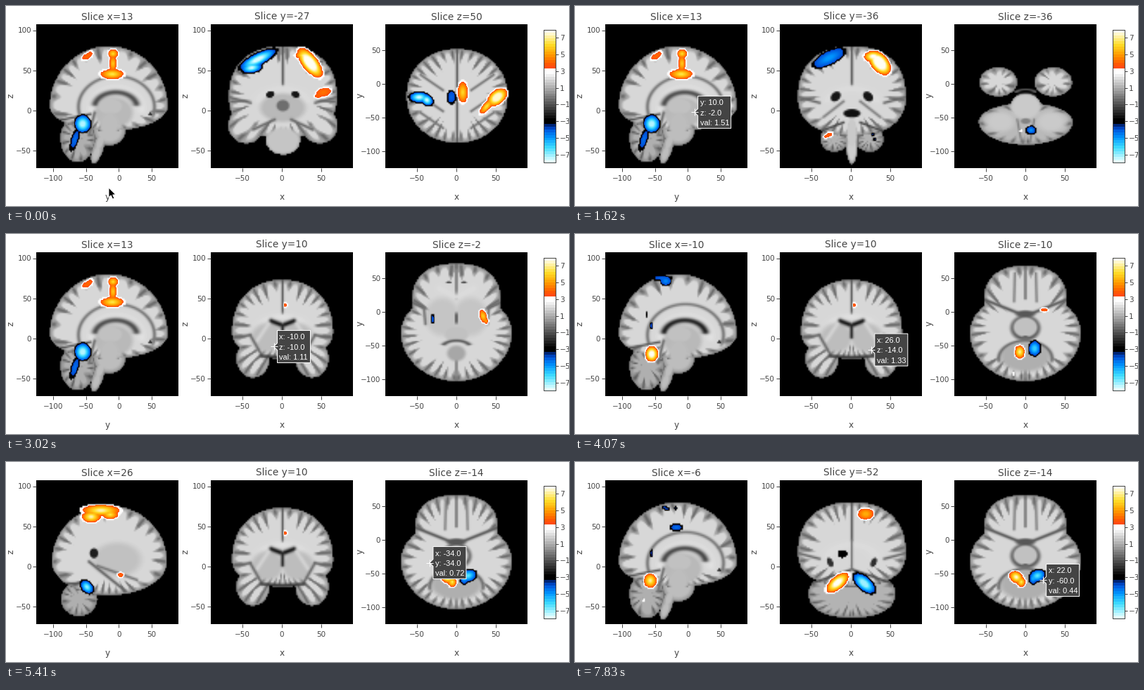
Animation of 800x285 px, one loop 8 s. Source, as a matplotlib script:

```python
import numpy as np
import matplotlib.pyplot as plt
from matplotlib.animation import FuncAnimation
from matplotlib.colors import LinearSegmentedColormap
from matplotlib.patches import Polygon

STEP, LOOP = 25, 8000
TOP, W, H = 26, 202, 205
INK = "#444444"
VMAX = 7.9

# left edge, x origin, px per mm, y origin, px per mm, axis names
GEO = {
    "sag": (43, 160.3, 0.935, 149, 1.145, "yz"),
    "cor": (291, 391.7, 1.12, 149, 1.145, "xz"),
    "ax": (539, 640.0, 1.12, 111, 0.957, "xy"),
}

WARM = [(3.3, "#ffffff"), (3.5, "#ff4a14"), (4, "#ff5c00"), (5, "#ff9c00"),
        (6.3, "#ffdc28"), (VMAX, "#fffff4")]
COOL = [(-VMAX, "#e4ffff"), (-6.3, "#40dcff"), (-5, "#0096ff"), (-4, "#0050d8"),
        (-3.4, "#00185a"), (-3.2, "#000000")]
STOPS = COOL + [(-2.9, "#000000"), (2.9, "#ffffff")] + WARM
CMAP = LinearSegmentedColormap.from_list(
    "stat", [((v + VMAX) / (2 * VMAX), c) for v, c in STOPS], N=512)


def ramp(x):
    x = np.clip(x, 0, 1)
    return x * x * (3 - 2 * x)


def radius(x, y, cx, cy, rx, up, down=None, p=2.0, tilt=0):
    """Normalised radius of an egg: 1 on its outline, 0 at its centre."""
    a = np.radians(tilt)
    dx, dy = x - cx, y - cy
    u, w = dx * np.cos(a) + dy * np.sin(a), dy * np.cos(a) - dx * np.sin(a)
    ry = np.where(w < 0, up, down or up)
    return np.maximum((abs(u / rx) ** p + abs(w / ry) ** p) ** (1 / p), 0.02)


class Slice:
    """Value field on a 2 mm grid; symmetric slices are folded at `mid`."""

    def __init__(self, name, mid=None):
        left, _, sx, _, sy, _ = GEO[name]
        nx, ny = round(W / 2 / sx), round(H / 2 / sy)
        self.X, self.y = np.meshgrid(left + (np.arange(nx) + 0.5) * W / nx,
                                     TOP + (np.arange(ny) + 0.5) * H / ny)
        self.x = self.X if mid is None else abs(self.X - mid)
        self.v = np.full(self.X.shape, -3.0)
        self.inside = np.zeros(self.X.shape, bool)

    def mix(self, v, w):
        self.v += (v - self.v) * w * self.inside

    def body(self, *eggs, folds=28, deep=22, seed=1, white=2.0, cortex=0.8):
        """Union of eggs whose white matter reaches out in fingers between sulci."""
        d = np.max([(1 / radius(self.x, self.y, *e) - 1)
                    * np.hypot(self.x - e[0], self.y - e[1]) for e in eggs], axis=0)
        th = np.arctan2(self.x - eggs[0][0], eggs[0][1] - self.y)
        phase = folds * th + 1.4 * np.sin(3 * th + seed) + 0.06 * d * np.sin(5 * th + 2 * seed)
        valley = 0.5 - 0.5 * np.cos(phase)
        reach = deep * (0.75 + 0.3 * np.sin(7 * th + seed))
        tissue = cortex + (white - cortex) * ramp((d - 2 - reach * valley**2) / 6)
        tissue -= 1.3 * valley**6 * ramp((reach - d) / 6 + 0.3) * ramp(d / 4)
        tissue = -0.8 + (tissue + 0.8) * ramp((d + 0.6) / 3)
        self.v = np.where(d > 0, tissue, self.v)
        self.inside |= d > 0

    def ell(self, cx, cy, rx, ry, v, soft=0.4, tilt=0):
        r = radius(self.x, self.y, cx, cy, rx, ry, tilt=tilt)
        self.mix(v, ramp((1 - r) / soft + 0.5))

    def line(self, x0, y0, x1, y1, width, v):
        dx, dy = x1 - x0, y1 - y0
        t = ((self.x - x0) * dx + (self.y - y0) * dy) / (dx * dx + dy * dy)
        t = np.clip(t, 0, 1)
        d = np.hypot(self.x - x0 - t * dx, self.y - y0 - t * dy)
        self.mix(v, np.exp(-(d / width) ** 2))

    def arc(self, cx, cy, rx, ry, width, v, span=90):
        """Arch over the centre; `span` is the half angle from the top."""
        d = (radius(self.x, self.y, cx, cy, rx, ry) - 1) * min(rx, ry)
        off = np.degrees(abs(np.arctan2((self.x - cx) / rx, (cy - self.y) / ry)))
        self.mix(v, np.exp(-(d / width) ** 2) * ramp((span - off) / 15 + 0.5))

    def blob(self, peak, *ovals, core=6):
        """Activation spot; each oval is cx, cy, rx, ry and optionally a tilt."""
        s, edge = np.sign(peak), min(3.9, abs(peak))
        d = np.max([(1 - radius(self.X, self.y, *o[:4], tilt=sum(o[4:]))) * min(o[2:4])
                    for o in ovals], axis=0)
        rim = min(1.6, 0.4 * min(min(o[2:4]) for o in ovals))
        val = s * (edge + (abs(peak) - edge) * np.clip(d / core, 0, 1))
        ring = np.maximum(self.v * s, 2.9) * s
        self.v = np.where(d > 0, val, np.where(d > -rim, ring, self.v))


def sag_mid(seed, ventricle):
    s = Slice("sag")
    s.body((102, 188, 25, 30, 35), folds=12, deep=17, seed=seed, white=1.1, cortex=0.5)
    s.body((131, 202, 8, 24, 24, 2, 18), (147, 177, 23, 22), folds=0, deep=0, white=1.4)
    s.body((146, 143, 84, 86, 35), folds=24, deep=20, seed=seed)
    s.arc(157, 144, 54, 44, 2.2, -0.1, 110)
    s.arc(157, 145, 36, 28, 5, 2.2, 105)
    s.ell(153, 152, 27, 22, 1.3)
    s.arc(156, 144, 30, 21, 3.6, ventricle, 85)
    s.ell(148, 143, 17, 11, 1.5)
    s.ell(147, 170, 14, 18, 1.4, 0.6)
    s.line(126, 152, 118, 184, 2.2, -0.3)
    s.line(70, 164, 120, 154, 1.8, -0.9)
    s.ell(205, 154, 2.5, 2, -1.8)
    return s


def sag_lateral(seed, cx, rx):
    s = Slice("sag")
    s.body((104, 195, 26, 25), folds=12, deep=14, seed=seed, white=1.1, cortex=0.5)
    s.body((cx, 142, rx, 80, 48), folds=25, deep=18, seed=seed)
    s.line(76, 174, 118, 172, 1.8, -1)
    return s


def sag_13():
    s = sag_mid(2, -1.1)
    s.blob(6.6, (152, 68, 7, 6), (152, 82, 5, 11), (151, 97, 16, 7))
    s.blob(4.4, (116, 71, 8, 4, -35))
    s.blob(-4.8, (98, 190, 13, 4, -72))
    s.blob(-7.4, (109, 168, 11, 12), core=8)
    return s.v


def sag_m10():
    s = sag_mid(4, -2.1)
    s.blob(-5, (124, 63, 11, 3), (129, 67, 7, 6))
    s.blob(-3.9, (109, 131, 1.7, 4), (102, 115, 1.3, 3))
    s.blob(7.9, (109, 171, 9, 11))
    return s.v


def sag_m6():
    s = sag_mid(6, -1.2)
    s.blob(-3.7, (129, 66, 5, 2.5, 25), (143, 66, 1.7, 2.5), (109, 130, 1.5, 4.5))
    s.blob(-4.8, (144, 93, 7, 4))
    s.blob(7.3, (107, 169, 9, 10), core=8)
    s.blob(3.2, (98, 197, 1.5, 1.5))
    return s.v


def sag_26():
    s = sag_lateral(3, 147, 82)
    s.ell(158, 139, 34, 24, 1.5, 0.5)
    s.ell(125, 130, 6, 7, -2.2)
    s.line(118, 142, 170, 184, 2.2, -0.6)
    s.line(130, 148, 186, 168, 2, -0.2)
    s.blob(7.4, (135, 69, 26, 8), (121, 78, 13, 8), (148, 75, 11, 6), core=7)
    s.blob(4.4, (163, 161, 4, 3))
    s.blob(-7.2, (115, 178, 10, 7, 50))
    return s.v


def sag_m34():
    s = sag_lateral(5, 147, 75)
    s.ell(150, 125, 36, 18, 1.9, 0.7)
    s.line(132, 138, 184, 160, 2.4, -0.5)
    s.line(126, 156, 162, 166, 2.2, 0.1)
    s.blob(-7.8, (136, 79, 16, 11), (138, 90, 9, 11), core=5)
    s.blob(-4.6, (143, 86, 2, 4))
    s.blob(-5.2, (142, 128, 6, 4))
    return s.v


def cor_base(seed, down, *extra):
    s = Slice("cor", 393.5)
    s.body((0, 130, 77, 73, down, 2.3), *extra, deep=25, seed=seed)
    s.line(0, 56, 0, 112, 1.8, -1)
    s.arc(0, 138, 34, 20, 5, 2.1)
    s.line(76, 130, 46, 138, 2, -0.5)
    return s


def cor_m27():
    s = cor_base(2, 58, (52, 170, 26, 26), (0, 190, 25, 22))
    s.ell(0, 145, 32, 20, 1.3)
    s.ell(0, 142, 9, 8, -0.4)
    s.ell(18, 126, 6, 4.5, -2.4, tilt=20)
    s.line(12, 162, 42, 176, 2.2, -0.5)
    s.ell(0, 192, 24, 19, 1.6)
    s.blob(-7.8, (358, 76, 27, 8, -27), (349, 88, 14, 7, -10))
    s.blob(7.9, (432, 81, 25, 11, 52), (424, 70, 12, 6))
    s.blob(4.4, (451, 123, 11, 6, -15), (444, 128, 5, 3))
    return s.v


def cor_m36(peak):
    s = Slice("cor", 393.5)
    s.body((25, 190, 20, 22, 18), folds=12, deep=14, white=1.2, cortex=0.5)
    s.body((0, 190, 9, 28, 36), folds=0, deep=0, white=1.8)
    base = cor_base(3, 55)
    s.v = np.where(base.inside, base.v, s.v)
    s.inside |= base.inside
    s.ell(0, 153, 12, 6, -2.5)
    s.ell(23, 129, 8, 6, -2.4, tilt=45)
    s.line(12, 136, 40, 158, 2, 0)
    s.ell(0, 180, 7, 20, 1.7)
    s.line(12, 166, 48, 180, 1.8, -1.3)
    s.blob(peak, (361, 74, 23, 9, -27), core=7)
    s.blob(7.9, (433, 81, 20, 12, 50), (424, 72, 13, 8))
    s.blob(4.2, (360, 184, 6, 3, -25))
    s.blob(-3.5, (423, 183, 2, 2), (426, 190, 1.5, 1.5))
    return s.v


def cor_m52():
    s = Slice("cor", 393.5)
    s.body((0, 187, 62, 30, 35, 2.3), folds=26, deep=17, white=1.2, cortex=0.6)
    base = cor_base(5, 48)
    s.v = np.where(base.inside, base.v, s.v)
    s.inside |= base.inside
    s.ell(31, 143, 4, 7, -1.8, tilt=25)
    s.line(0, 153, 66, 176, 1.8, -1.1)
    s.line(0, 112, 0, 152, 1.5, -0.4)
    s.blob(-3.1, (380, 131, 5, 4))
    s.blob(5.3, (413, 74, 11, 8))
    s.blob(7.9, (373, 172, 19, 9, -40))
    s.blob(-7.2, (411, 173, 18, 9, 42))
    return s.v


def cor_10():
    s = Slice("cor", 393)
    s.body((0, 140, 72, 75, 38, 2.2), (42, 177, 24, 24, 28), deep=24, seed=4)
    s.line(0, 62, 0, 113, 1.7, -0.9)
    s.arc(0, 138, 32, 20, 5, 2.2)
    s.ell(22, 148, 22, 21, 1.4, 0.5)
    s.line(3, 129, 16, 124, 3.4, -2.4)
    s.line(0, 130, 0, 147, 2.4, -2)
    s.line(20, 128, 36, 152, 3, 1.9)
    s.line(72, 148, 46, 144, 2.1, -0.5)
    s.line(46, 144, 30, 172, 2.1, -0.4)
    s.line(0, 176, 30, 174, 2.4, -1.5)
    s.blob(4.4, (397, 101, 2.5, 3))
    return s.v


def ax_50():
    s = Slice("ax", 641)
    s.body((0, 128, 72, 67, 67, 2.1), folds=30, deep=26, seed=3)
    s.line(0, 60, 0, 197, 1.8, -0.9)
    for y in (112, 142, 166):
        s.line(20, y + 8, 52, y - 14, 1.9, -0.2)
    s.blob(-7.8, (587, 130, 13, 7), (598, 134, 9, 7, 40))
    s.blob(-4.4, (633, 130, 5, 8))
    s.blob(6.2, (649, 123, 7, 15))
    s.blob(7.6, (698, 130, 16, 10, -40), (683, 143, 13, 5, -50))
    return s.v


def ax_m36():
    s = Slice("ax", 640.5)
    s.body((39, 109, 27, 22, 20), folds=9, deep=14, seed=2)
    s.body((0, 165, 67, 27, 33), (0, 143, 22, 18), folds=18, deep=13, white=1.3, cortex=0.8)
    s.inside |= np.hypot(s.x, s.y - 121) < 16
    s.arc(0, 124, 14, 5, 1.4, -0.8)
    s.ell(0, 143, 21, 18, 1.7)
    s.ell(36, 165, 20, 14, 1.7, 0.8)
    s.ell(0, 164, 7, 4, 0.1, 0.7)
    s.line(12, 162, 6, 194, 1.6, 0)
    s.blob(-5.4, (648, 177, 6, 5))
    s.blob(3.6, (634, 178, 1.8, 1.5))
    return s.v


def ax_base(seed, frontal, front):
    s = Slice("ax", 640)
    s.body((0, 140, 79, 56, 70), (0, 95, frontal, 95 - front, 50, 2.4),
           folds=32, deep=22, seed=seed)
    s.line(0, 40, 0, 92, 1.7, -0.8)
    s.line(0, 178, 0, 214, 1.7, -0.6)
    return s


def ax_m2():
    s = ax_base(2, 63, 42)
    s.line(0, 90, 24, 78, 5, 2.1)
    s.ell(20, 118, 24, 27, 1.6, 0.5)
    s.line(66, 96, 46, 106, 2.1, -0.5)
    s.line(46, 106, 44, 128, 2.1, -0.3)
    s.ell(0, 120, 2, 9, -0.6, 0.7)
    s.ell(0, 143, 17, 11, 1.5)
    s.arc(0, 162, 20, 10, 2, -0.8, 70)
    s.ell(0, 170, 13, 11, 0.9, 0.6)
    s.ell(11, 69, 3.5, 1.8, -1.6)
    s.blob(-4.6, (606, 121, 2, 5.5))
    s.blob(6.9, (678, 117, 5, 9, -15), (682, 124, 3, 4))
    return s.v


def ax_low(seed, front):
    s = ax_base(seed, 59, front)
    s.line(15, 56, 16, 96, 1.9, 0)
    s.line(62, 92, 2, 116, 2.4, -0.8)
    s.ell(0, 114, 13, 5, -0.9, 0.8)
    s.ell(0, 134, 21, 18, -0.9, 0.4)
    s.ell(0, 133, 17, 14, 1.5, 0.3)
    s.ell(0, 148, 5, 3, -0.6, 0.6)
    s.ell(0, 174, 36, 22, 1.1, 0.4)
    s.arc(0, 178, 38, 26, 1.8, -0.4, 100)
    return s


def ax_m10():
    s = ax_low(3, 45)
    s.blob(7.2, (632, 168, 7, 9))
    s.blob(-6, (653, 163, 8, 10))
    s.blob(4.4, (667, 108, 5, 2.5))
    s.blob(3.1, (623, 199, 1.3, 2))
    return s.v


def ax_m14():
    s = ax_low(5, 47)
    s.blob(7.7, (627, 164, 10, 8, 35), (634, 171, 6, 7), core=7)
    s.blob(-7, (657, 162, 11, 8, -20), (651, 166, 5, 7), core=8)
    return s.v


s13, c10, a14 = sag_13(), cor_10(), ax_m14()
# start time, slice positions, fields
SCENES = [
    (0, (13, -27, 50), (s13, cor_m27(), ax_50())),
    (1230, (13, -36, -36), (s13, cor_m36(-5), ax_m36())),
    (2530, (13, 10, -2), (s13, c10, ax_m2())),
    (3870, (-10, 10, -10), (sag_m10(), c10, ax_m10())),
    (5090, (26, 10, -14), (sag_26(), c10, a14)),
    (6240, (-34, -34, -14), (sag_m34(), cor_m36(-4.6), a14)),
    (7510, (-6, -52, -14), (sag_m6(), cor_m52(), a14)),
]


def place(name, u, w):
    _, x0, sx, y0, sy, _ = GEO[name]
    return np.array([x0 + u * sx, y0 - w * sy])


START = np.array([146, 259])
# first and last step time, steps, resting spot, value there
MOVES = [
    (20, 420, 16, ("sag", -36, -36), 1.24),
    (1460, 1620, 7, ("sag", 10, -2), 1.51),
    (2800, 3020, 10, ("cor", -10, -10), 1.11),
    (3870, 4070, 7, ("cor", 26, -14), 1.33),
    (5090, 5410, 15, ("ax", -34, -34), 0.72),
    (6420, 6680, 12, ("ax", -6, -52), 4.37),
    (7690, 7830, 8, ("ax", 22, -60), 0.44),
]

fig = plt.figure(figsize=(8, 2.85), dpi=100, facecolor="white")
ax = fig.add_axes([0, 0, 1, 1])
ax.axis("off")


def text(x, y, s, px, color=INK, font="DejaVu Sans", **kw):
    kw = {"ha": "center", "va": "center_baseline", **kw}
    return ax.text(x, y, s, fontsize=px * 0.72, color=color, family=font, **kw)


def rule(x, y, color=INK, **kw):
    return ax.plot(x, y, color=color, lw=0.72, solid_capstyle="butt", **kw)[0]


def num(n):
    return str(n).replace("-", "\u2212")


def picture(data, box, mode):
    return ax.imshow(data, cmap=CMAP, vmin=-VMAX, vmax=VMAX, extent=box,
                     interpolation=mode, aspect="auto")


TICKS = {"sag": (range(-100, 51, 50), range(-50, 101, 50)),
         "cor": (range(-50, 51, 50), range(-50, 101, 50)),
         "ax": (range(-50, 51, 50), range(-100, 51, 50))}
images, titles = [], []
for (name, geo), field in zip(GEO.items(), SCENES[0][2]):
    left, names = geo[0], geo[5]
    images.append(picture(field, (left, left + W, TOP + H, TOP), "bilinear"))
    titles.append(text(left + W / 2, 14, "", 13.6))
    text(left + W / 2, 271, names[0], 12)
    text(left - 36, 127.5, names[1], 12, rotation=90, va="center")
    for u in TICKS[name][0]:
        x = place(name, u, 0)[0]
        rule([x, x], [TOP + H, TOP + H + 5])
        text(x, 245, num(u), 10.4)
    for w in TICKS[name][1]:
        y = place(name, 0, w)[1]
        rule([left - 5, left], [y, y])
        text(left - 7, y, num(w), 10.4, ha="right")

picture(np.linspace(VMAX, -VMAX, 48)[:, None], (764, 781, 223, 34), "nearest")
rule([764, 781, 781, 764, 764], [34, 34, 223, 223, 34])
for v in range(7, -8, -2):
    y = 128.5 - 11.95 * v
    rule([781, 785], [y, y])
    text(787, y, num(v), 10.4, ha="left")

tip = ax.add_patch(Polygon([(0, 0), (1, 1), (1, 0)], fc=INK, ec="white", lw=0.72, zorder=5))
rows = [text(0, 0, "", 11, "white", "Liberation Sans", ha="left", va="baseline", zorder=6)
        for _ in range(3)]
cross = [rule([], [], "white", zorder=7) for _ in range(2)]
ARROW = np.array([(0, 0), (0, 13.5), (3.2, 10.8), (5.5, 16), (7.8, 15), (5.6, 10), (9.8, 9.8)])
arrow = ax.add_patch(Polygon(ARROW, fc="black", ec="white", lw=0.6, zorder=7))
ax.set_xlim(0, 800)
ax.set_ylim(285, 0)


def pointer(t):
    """Position, resting value or None, and start time of the latest move."""
    pos, val, since = START, None, -1
    for t0, t1, n, rest, rest_val in MOVES:
        if t < t0:
            break
        k = min(n, 1 + round((t - t0) / (t1 - t0) * (n - 1)))
        pos = pos + (place(*rest) - pos) * ramp(k / n)
        val, since = (rest_val if k == n else None), t0
    return pos, val, since


def panel_at(x, y):
    for k, (name, geo) in enumerate(GEO.items()):
        if geo[0] <= x < geo[0] + W and TOP <= y < TOP + H:
            return k, name
    return None


def show_tip(x, y, name, field, val):
    left, x0, sx, y0, sy, names = GEO[name]
    u, w = 2 * round((x - x0) / sx / 2), 2 * round((y0 - y) / sy / 2)
    if val is None:
        ny, nx = field.shape
        val = field[int((y - TOP) / H * ny), int((x - left) / W * nx)]
    cx, cy = place(name, u, w)
    near, far = cx + 5, cx + 52 + 3.7 * (val < 0)
    tip.set_xy([(cx, cy), (near, cy - 5), (near, cy - 23), (far, cy - 23),
                (far, cy + 23), (near, cy + 23), (near, cy + 5)])
    lines = [f"{names[0]}: {u:.1f}", f"{names[1]}: {w:.1f}", f"val: {val:.2f}"]
    for k, (row, s) in enumerate(zip(rows, lines)):
        row.set_text(s)
        row.set_position((cx + 8, cy - 10 + 14.4 * k))


def draw(i):
    t = (i + 0.5) * STEP
    since, where, fields = [s for s in SCENES if s[0] <= t][-1]
    for im, title, field, axis, at in zip(images, titles, fields, "xyz", where):
        im.set_data(field)
        title.set_text(f"Slice {axis}={at}")
    (x, y), val, moved = pointer(t)
    hit = panel_at(x, y)
    # a click hides the label until the pointer moves again
    labelled = hit is not None and moved >= since
    if labelled:
        show_tip(x, y, hit[1], fields[hit[0]], val)
    for a in [tip] + rows:
        a.set_visible(labelled)
    arrow.set_visible(hit is None)
    arrow.set_xy(ARROW + (x, y))
    cross[0].set_data([x - 5, x + 5], [y, y])
    cross[1].set_data([x, x], [y - 5, y + 5])
    for c in cross:
        c.set_visible(hit is not None)
    return images + titles + rows + cross + [tip, arrow]


anim = FuncAnimation(fig, draw, frames=LOOP // STEP, interval=STEP,
                     init_func=lambda: draw(0), repeat=True, repeat_delay=0, blit=False)
plt.show()
```
